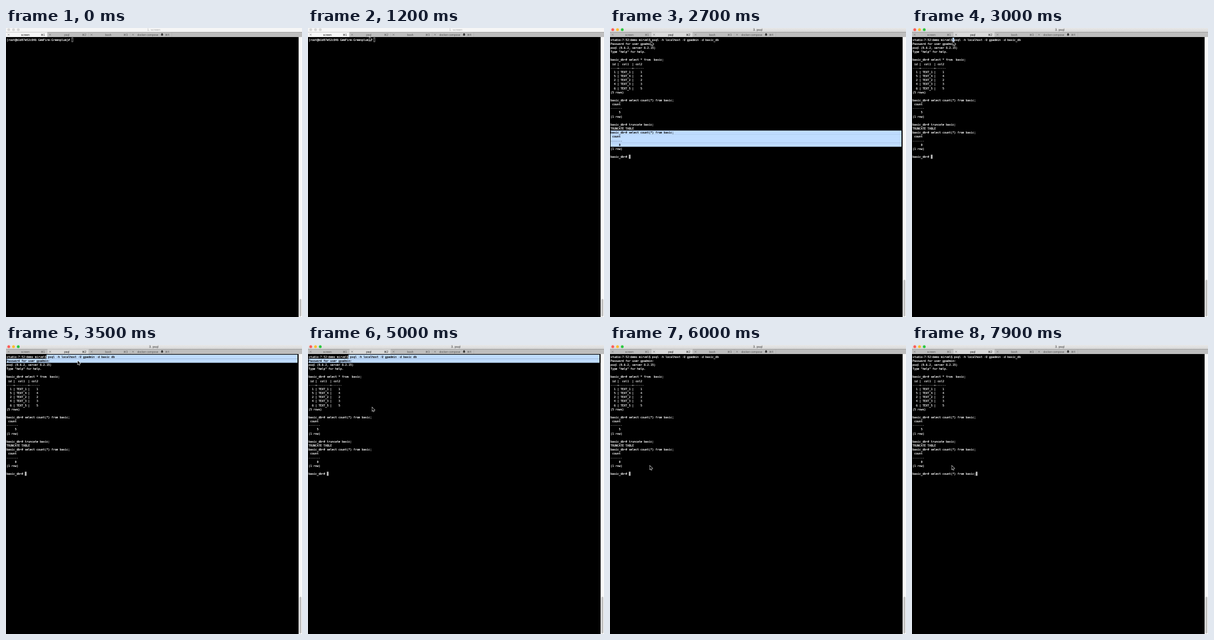
An HTML page with a canvas that plays this animation: 524 by 512 pixels, repeating every 8000 ms.

```html
<!DOCTYPE html>
<html lang="en">
<head>
<meta charset="utf-8">
<title>Terminal session</title>
<style>
  html, body { margin: 0; width: 100%; height: 100%; overflow: hidden; background: #000; }
  canvas { display: block; }
</style>
</head>
<body>
<canvas id="stage" width="524" height="512"></canvas>
<script>
const ctx = document.getElementById('stage').getContext('2d');
const DURATION = 8000;
const COLUMN = 2.945, ROW = 7.155, LEFT = 1, TOP = 17.1, RIGHT = 516;
const SANS = '"Liberation Sans", "DejaVu Sans", sans-serif';
const MONO = '"DejaVu Sans Mono", monospace';

const QUERY = 'select count(*) from basic;';
const SHELL_PROMPT = '[root@b1d07e52c846 GemFire-Greenplum]# ';
const SQL_PROMPT = 'basic_db=# ';
const SESSION = `studio-7-52:demo mirvel$ psql -h localhost -U gpadmin -d basic_db
Password for user gpadmin:
psql (9.6.2, server 8.2.15)
Type "help" for help.

basic_db=# select * from  basic;
 id |  col1  | col2
----+--------+------
  1 | TEXT_1 |    1
  5 | TEXT_4 |    4
  2 | TEXT_2 |    2
  4 | TEXT_3 |    3
  6 | TEXT_5 |    5
(5 rows)

basic_db=# ${QUERY}
 count
-------
     5
(1 row)

basic_db=# truncate basic;
TRUNCATE TABLE
basic_db=# ${QUERY}
 count
-------
     0
(1 row)
`.split('\n');

// Pointer positions: [time, x, y], each held until the next
const POINTER = [
  [500, 352, 9], [700, 159, 15], [1000, 116, 15], [1200, 108.5, 15.5],
  [2000, 105, 26.5], [2200, 86, 26], [2500, 61, 24.5], [2700, 72.5, 24],
  [3500, 127, 28], [3700, 167, 28], [3900, 175, 28], [4000, 184, 28],
  [4700, 166.5, 54], [5000, 113.5, 110.5], [5200, 104.5, 119],
  [5500, 84.5, 182], [5700, 70.5, 214]
];

const TABS = [
  { label: 'screen', center: 34.3, key: 69 },
  { label: 'psql', center: 107.5, key: 142 },
  { label: 'bash', center: 181, key: 215.5 },
  { label: 'docker-compose', center: 251, key: 289 }
];
const TAB_WIDTH = 73.4;

function rect(x, y, w, h, color) {
  ctx.fillStyle = color;
  ctx.fillRect(x, y, w, h);
}

function dot(x, y, r, color) {
  ctx.fillStyle = color;
  ctx.beginPath();
  ctx.arc(x, y, r, 0, 2 * Math.PI);
  ctx.fill();
}

// Large type scaled down keeps fractional letter spacing
function text(string, x, y, size, family, color, align = 'left') {
  ctx.save();
  ctx.translate(x, y);
  ctx.scale(0.1, 0.1);
  ctx.font = `${size * 10}px ${family}`;
  ctx.textAlign = align;
  ctx.fillStyle = color;
  ctx.fillText(string, 0, 0);
  if (family === MONO) {
    ctx.strokeStyle = color;
    ctx.lineWidth = 1.5;
    ctx.strokeText(string, 0, 0);
  }
  ctx.restore();
}

const columnX = column => LEFT + column * COLUMN;
const rowY = row => TOP + row * ROW;

function line(string, row, color = '#fff', column = 0) {
  text(string, columnX(column), rowY(row) + 5.6, COLUMN / 0.602, MONO, color);
}

function select(row, from = 0, to = Infinity) {
  const x = columnX(from);
  rect(x, rowY(row), Math.min(columnX(to), RIGHT) - x, ROW + 0.1, '#bfdcff');
  line(SESSION[row].slice(from, to), row, '#000', from);
}

function drawTab(tab, index, selected, active) {
  const x = index * TAB_WIDTH;
  const current = index === selected;
  const ink = current ? '#181818' : '#555';
  if (current) rect(x, 7.5, TAB_WIDTH, 8.5, active ? '#d9d9d9' : '#f6f6f6');
  rect(x + TAB_WIDTH - 0.4, 7.5, 0.4, 8.5, '#a5a5a5');
  ctx.strokeStyle = '#666';
  ctx.lineWidth = 0.6;
  ctx.beginPath();
  ctx.moveTo(x + 3, 10.3);
  ctx.lineTo(x + 6.2, 13.5);
  ctx.moveTo(x + 6.2, 10.3);
  ctx.lineTo(x + 3, 13.5);
  ctx.stroke();
  text(tab.label, tab.center, 13.6, 5, SANS, ink, 'center');
  text('⌘' + (index + 1), tab.key, 13.6, 4.8, SANS, ink, 'right');
}

function drawBell(x, y) {
  ctx.fillStyle = '#333';
  ctx.beginPath();
  ctx.moveTo(x - 2.3, y + 1.4);
  ctx.quadraticCurveTo(x - 1.4, y, x - 1.4, y - 1);
  ctx.arc(x, y - 1, 1.4, Math.PI, 0);
  ctx.quadraticCurveTo(x + 1.4, y, x + 2.3, y + 1.4);
  ctx.fill();
  dot(x, y + 1.7, 0.7, '#333');
}

function drawWindow(time, active) {
  const shade = ctx.createLinearGradient(0, 0, 0, 7.5);
  shade.addColorStop(0, active ? '#e8e8e8' : '#f6f6f6');
  shade.addColorStop(1, active ? '#d6d6d6' : '#f6f6f6');
  rect(0, 0, 524, 7.5, shade);
  const lights = active ? ['#fc5b57', '#fdbc2e', '#28c83f'] : Array(3).fill('#d6d6d6');
  lights.forEach((color, i) => dot(4.9 + i * 8.4, 2.9, 2.5, color));
  const title = !active ? '1. screen' : time < 1700 ? '3. screen' : '3. psql';
  text(title, 261.5, 4.8, 5.6, SANS, active ? '#333' : '#aaa', 'center');

  rect(0, 7.5, 524, 8.5, '#bebebe');
  rect(0, 7.2, 524, 0.4, '#aaa');
  TABS.forEach((tab, i) => drawTab(tab, i, active ? 1 : 0, active));
  drawBell(276.3, 11.7);

  rect(518, 16, 6, 496, '#fafafa');
  ctx.fillStyle = '#c1c1c1';
  ctx.beginPath();
  const thumbTop = active ? 446 : 480;
  ctx.roundRect(519.2, thumbTop, 3.7, 511 - thumbTop, 1.8);
  ctx.fill();
}

function drawShell() {
  line(SHELL_PROMPT, 0);
  ctx.strokeStyle = '#aaa';
  ctx.lineWidth = 0.7;
  ctx.strokeRect(columnX(SHELL_PROMPT.length) + 0.3, 17.3, 2.5, 7);
}

function drawSession(time) {
  SESSION.forEach((string, row) => line(string, row));
  const input = SQL_PROMPT + (time >= 7400 ? QUERY : '');
  const row = SESSION.length;
  line(input, row);
  rect(columnX(input.length), rowY(row) - 0.1, COLUMN, ROW, '#c4c4c4');

  if (time < 3000) {
    for (let i = 23; i <= 26; i++) select(i);
  } else if (time < 3500) {
    select(0, 24, 25);
  } else if (time < 6000) {
    select(0, 24);
    select(1);
  }
}

function drawPointer(time) {
  const position = POINTER.findLast(([start]) => time >= start);
  if (!position) return;
  ctx.save();
  ctx.translate(position[1], position[2]);
  ctx.beginPath();
  [[0, 0], [0, 6.3], [1.5, 5], [2.5, 7.5], [3.6, 7], [2.6, 4.7], [4.6, 4.5]]
    .forEach(([x, y]) => ctx.lineTo(x, y));
  ctx.closePath();
  ctx.lineWidth = 1.1;
  ctx.strokeStyle = '#fff';
  ctx.stroke();
  ctx.fillStyle = '#000';
  ctx.fill();
  ctx.restore();
}

function draw(now) {
  const time = now % DURATION;
  const active = time >= 1500;
  rect(0, 0, 524, 512, '#000');
  drawWindow(time, active);
  if (active) drawSession(time);
  else drawShell();
  drawPointer(time);
  requestAnimationFrame(draw);
}

requestAnimationFrame(draw);
</script>
</body>
</html>
```
